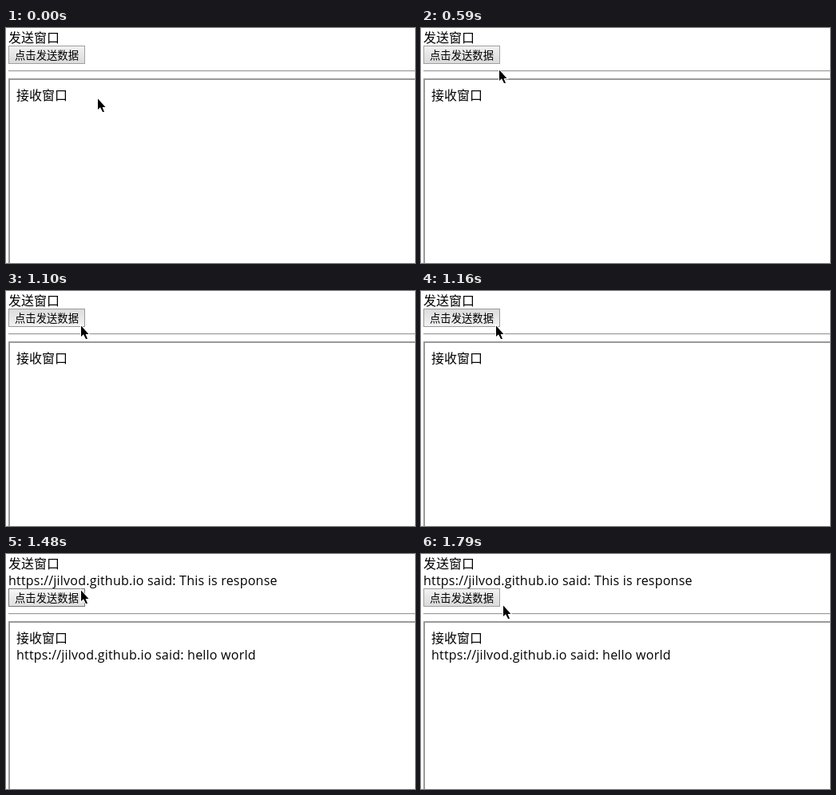
An HTML page for the animation above (4030 ms loop, 512 by 294 pixels).

```html
<!DOCTYPE html>
<html lang="zh-CN">
<head>
<meta charset="utf-8">
<title>postMessage</title>
<style>
  html, body { margin: 0; height: 100%; overflow: hidden; background: #fff; }
  svg { display: block; width: 100vw; height: 100vh; }
  text { font: 16px "Noto Sans CJK SC", "Noto Sans CJK", sans-serif; fill: #000; }
  text.msg { font-family: "Open Sans", "Noto Sans", sans-serif; letter-spacing: .22px; }
  text.label { font-size: 13.333px; }
</style>
</head>
<body>
<svg viewBox="0 0 512 294">
  <defs>
    <linearGradient id="normal" x2="0" y2="1"><stop stop-color="#f2f2f2"/><stop offset="1" stop-color="#dadada"/></linearGradient>
    <linearGradient id="hover" x2="0" y2="1"><stop stop-color="#f7f7f7"/><stop offset="1" stop-color="#dedede"/></linearGradient>
    <linearGradient id="pressed" x2="0" y2="1"><stop stop-color="#dcdcdc"/><stop offset="1" stop-color="#f3f3f3"/></linearGradient>
  </defs>

  <text x="3" y="18">发送窗口</text>
  <text class="msg reply" x="3" y="39">https://jilvod.github.io said: This is response</text>

  <g id="flow">
    <rect id="button" x="3.5" y="22.5" width="95" height="22"/>
    <text class="label" x="11" y="38.5">点击发送数据</text>
    <path d="M3 53H512V54H3Z" fill="#9a9a9a"/>
    <path d="M3 54H512V55H3Z" fill="#eee"/>
    <path d="M3 63H512V65H5V294H3Z" fill="#9a9a9a"/>
    <text x="13" y="90">接收窗口</text>
    <text class="msg reply" x="13" y="111">https://jilvod.github.io said: hello world</text>
  </g>

  <path id="arrow" d="M1 1.5V15L4 12.2L7 18H9L6.6 12H10.5Z" stroke="#fff" stroke-width="2" paint-order="stroke"/>
  <path id="beam" d="M-3 -7.5H-1L0 -7L1 -7.5H3M0 -7V7M-3 7.5H-1L0 7L1 7.5H3" fill="none" stroke="#000"/>
</svg>
<script>
const LOOP = 4030;
const REPLY_AT = 1210;

// [time, x, y, button state, pointer]
const steps = [
  [0, 114, 87, "normal", "arrow"],
  [350, 113, 83, "normal", "arrow"],
  [410, 109, 74, "normal", "arrow"],
  [470, 104, 64, "normal", "arrow"],
  [530, 100, 56, "normal", "arrow"],
  [590, 97, 51, "normal", "arrow"],
  [650, 96, 48, "normal", "arrow"],
  [710, 95, 45, "normal", "arrow"],
  [770, 95, 43, "hover", "arrow"],
  [920, 93, 42, "hover", "arrow"],
  [1100, 93, 42, "pressed", "arrow"],
  [REPLY_AT, 93.5, 41, "normal", "beam"],
  [1480, 93, 44, "hover", "arrow"],
  [1550, 94, 46, "hover", "arrow"],
  [1620, 99, 55, "normal", "arrow"],
  [1700, 104, 64, "normal", "arrow"],
  [1790, 102, 63, "normal", "arrow"]
];
const borders = { normal: "#a0a0a0", hover: "#767676", pressed: "#999" };

const byId = id => document.getElementById(id);
const flow = byId("flow"), button = byId("button");
const pointers = [byId("arrow"), byId("beam")];
const replies = document.querySelectorAll(".reply");
const show = (el, on) => el.setAttribute("visibility", on ? "visible" : "hidden");

function draw(t) {
  const [, x, y, state, kind] = steps.findLast(step => step[0] <= t);
  const replied = t >= REPLY_AT;
  flow.setAttribute("transform", `translate(0 ${replied ? 21 : 0})`);
  replies.forEach(el => show(el, replied));
  button.setAttribute("fill", `url(#${state})`);
  button.setAttribute("stroke", borders[state]);
  for (const el of pointers) {
    show(el, el.id === kind);
    el.setAttribute("transform", `translate(${x} ${y})`);
  }
}

const start = performance.now();
function tick() {
  draw((performance.now() - start) % LOOP);
  requestAnimationFrame(tick);
}
tick();
</script>
</body>
</html>
```
